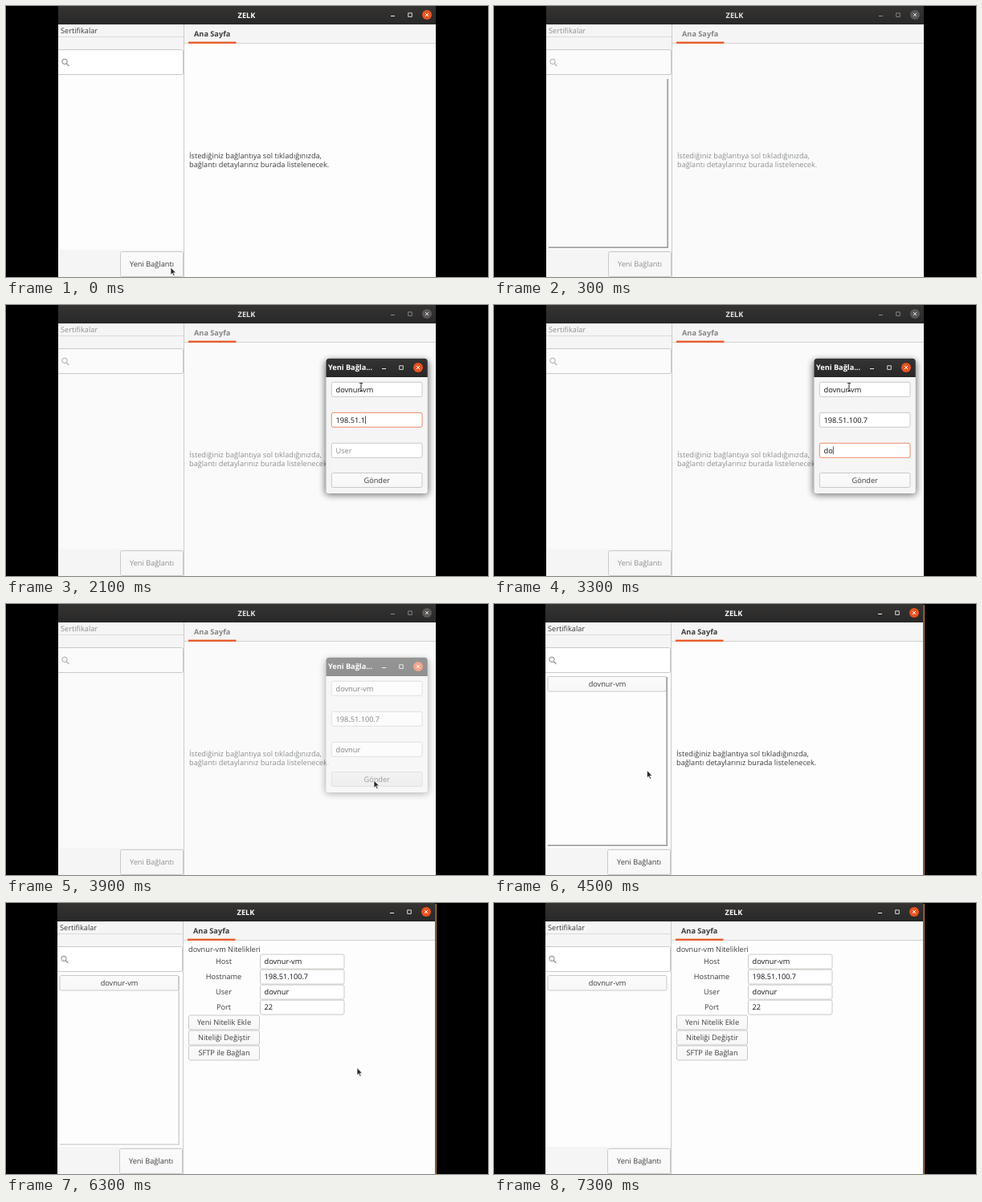
An HTML page for the animation above (7.5 s loop, 600x338 px).

```html
<!DOCTYPE html>
<html lang="tr">
<head>
<meta charset="utf-8">
<title>Zelk</title>
<style>
html, body { margin: 0; width: 100%; height: 100%; overflow: hidden; background: #000; }
svg { display: block; width: 100vw; height: 100vh; }
text { font: 9.2px "Open Sans", "Noto Sans", sans-serif; text-rendering: geometricPrecision; white-space: pre; }
.bold { font-weight: 700; }
.value { font-weight: 500; }
</style>
</head>
<body>
<svg id="stage" viewBox="0 0 600 338">
  <defs>
    <linearGradient id="bar" x2="0" y2="1"><stop stop-color="#353433"/><stop offset="1" stop-color="#292828"/></linearGradient>
    <linearGradient id="btn" x2="0" y2="1"><stop stop-color="#fbfbfb"/><stop offset="1" stop-color="#f7f7f7"/></linearGradient>
    <linearGradient id="hot" x2="0" y2="1"><stop stop-color="#ededed"/><stop offset="1" stop-color="#e3e3e3"/></linearGradient>
    <filter id="blur" x="-20%" y="-20%" width="140%" height="140%"><feGaussianBlur stdDeviation="4"/></filter>
  </defs>
  <g id="view"></g>
</svg>
<script>
const LOOP = 7500, STEP = 100;
const INK = '#3d3d3d', FADED = '#8e9090', DARK = '#111', EDGE = '#cbc9c7', PANEL = '#f5f5f5', ORANGE = '#e95420';
const USER = 'dovnur', HOST = USER + '-vm', IP = '198.51.100.7';
const view = document.getElementById('view');
const pen = document.createElement('canvas').getContext('2d');

const rect = (x, y, w, h, fill, extra = '') =>
  `<rect x="${x}" y="${y}" width="${w}" height="${h}" fill="${fill}" ${extra}/>`;
const box = (x, y, w, h, fill, edge = EDGE) =>
  rect(x + .5, y + .5, w - 1, h - 1, fill, `rx="2" stroke="${edge}"`);
const path = (d, stroke, width = 1, fill = 'none') =>
  `<path d="${d}" stroke="${stroke}" stroke-width="${width}" fill="${fill}"/>`;
// y is the middle of the line
const label = (x, y, str, fill = INK, anchor = 'start', cls = '') =>
  `<text x="${x}" y="${y + 3.2}" fill="${fill}" text-anchor="${anchor}" class="${cls}">${str}</text>`;
const button = (x, y, w, h, str, ink = INK, fill = 'url(#btn)') =>
  box(x, y, w, h, fill) + label(x + w / 2, y + h / 2, str, ink, 'middle');
const group = (str, opacity) => `<g opacity="${opacity}">${str}</g>`;

const clamp = v => Math.max(0, Math.min(1, v));
const ramp = (t, a, b) => clamp((t - a) / (b - a));

// keys: [time, value] pairs; the last one reached holds
const latest = (t, keys) => keys.reduce((v, [at, next]) => t >= at ? next : v, null);
const typed = (t, str, keys) => str.slice(0, latest(t, keys) || 0);

function winButtons(x, y, active) {
  const ink = active ? '#eee' : '#8c8c8c';
  return path(`M${x - 45} ${y + 1.5}h5`, ink) +
    path(`M${x - 23.3} ${y - 2.2}h4.6v4.6h-4.6z`, ink, .9) +
    `<circle cx="${x}" cy="${y}" r="6" fill="${active ? ORANGE : '#595857'}"/>` +
    path(`M${x - 2} ${y - 2}l4 4m0 -4l-4 4`, active ? '#fff' : '#ddd');
}

function sidebar(t, active, ink) {
  const icon = active ? '#808080' : '#a8a8a8';
  let s = rect(65, 23, 156, 315, PANEL) +
    rect(65, 86, 156, 218, active ? '#fdfdfd' : '#fafafa') +
    label(68, 31, 'Sertifikalar', ink) + rect(65, 38, 156, 1, '#dcdbda') +
    rect(65, 54, 155, 32, active ? '#fff' : '#fbfbfb') +
    path('M65 54.5H218.5q2 0 2 2V83.5q0 2 -2 2H65', EDGE) +
    `<circle cx="73" cy="69.3" r="3.2" fill="none" stroke="${icon}"/>` +
    path('M75.4 71.8l3 3', icon, 1.2);
  if (t >= 4100) {
    const hot = t >= 5000 && t < 6200;
    s += button(67.5, 90, 149, 19.5, HOST, ink, hot ? 'url(#hot)' : 'url(#btn)');
  }
  const lines = t < 1000 ? ramp(t, 100, 300) * (1 - ramp(t, 400, 700))
    : ramp(t, 4300, 4500) * (1 - ramp(t, 6000, 6500));
  if (lines) s += group(path('M216.2 91V301.2H68', '#a3a3a3', 1.8), lines);
  const pressed = t === STEP;
  return s + button(142, 306, 79, 32, 'Yeni Bağlantı', ink, pressed ? 'url(#hot)' : active ? 'url(#btn)' : '#f7f7f7');
}

function details() {
  const rows = [['Host', HOST], ['Hostname', IP], ['User', USER], ['Port', '22']];
  return label(228, 58.2, HOST + ' Nitelikleri') +
    rows.map(([name, value], i) => {
      const y = 63.6 + 19 * i;
      return label(272, y + 9.5, name, INK, 'middle') + box(317, y, 105.5, 19, '#fff') +
        label(322.5, y + 9.5, value, DARK, 'start', 'value');
    }).join('') +
    ['Yeni Nitelik Ekle', 'Niteliği Değiştir', 'SFTP ile Bağlan']
      .map((str, i) => button(228, 139.5 + 19 * i, 89, 19, str)).join('');
}

function mainWindow(t, active) {
  const ink = active ? INK : FADED;
  let s = rect(65, 0, 470, 338, active ? '#fdfdfd' : '#fafafa') +
    rect(65, 0, 470, 23, 'url(#bar)') +
    label(299.5, 11.5, 'ZELK', active ? '#fff' : '#e4e4e4', 'middle', 'bold') +
    winButtons(524, 11, active) + sidebar(t, active, ink) +
    rect(222, 23, 313, 23, PANEL) + rect(222, 46, 313, 1, '#d5d3d1') +
    rect(227, 44.6, 59.5, 2.2, ORANGE) +
    label(234, 35, 'Ana Sayfa', active ? INK : '#858585', 'start', 'bold') +
    rect(221, 23, 1, 315, '#cccac8');
  s += t >= 5400 ? details()
    : label(228, 187, 'İstediğiniz bağlantıya sol tıkladığınızda,', ink) +
      label(228, 197.5, 'bağlantı detaylarınız burada listelenecek.', ink);
  if (t < 4100) return s;
  return `<g transform="translate(-1)">${s}</g>` + rect(534.4, 1, 1.6, 337, '#b07a3a');
}

function dialog(t) {
  const fields = [
    ['Host', typed(t, HOST, [[600, 1], [700, 2], [800, 3], [900, 4], [1000, 6], [1100, 7], [1200, 8], [1300, 9]])],
    ['HostName', typed(t, IP, [[1700, 1], [1800, 3], [1900, 4], [2000, 6], [2100, 8], [2300, 9], [2400, 10], [2500, 11], [2600, 12]])],
    ['User', typed(t, USER, [[3100, 1], [3300, 2], [3400, 4], [3500, 6]])]
  ];
  const focus = latest(t, [[0, 0], [1500, 1], [2800, 2], [3700, 3]]);
  let s = rect(397, 69, 129, 168, '#000', 'rx="5" opacity=".55" filter="url(#blur)"') +
    rect(398.4, 66.7, 126.4, 168.3, PANEL, 'rx="3"') +
    path('M398.4 90V70.7q0 -4 4 -4h118.4q4 0 4 4V90z', 'none', 0, 'url(#bar)') +
    label(401, 78.2, 'Yeni Bağla...', '#fff', 'start', 'bold') + winButtons(513, 78, true);
  pen.font = '500 9.2px "Open Sans", "Noto Sans", sans-serif';
  fields.forEach(([hint, value], i) => {
    const y = 95.8 + 38 * i, on = i === focus;
    s += box(404.8, y, 113.7, 19, '#fff', on ? '#ee8a68' : EDGE);
    if (value) s += label(410.5, y + 9.5, value, DARK, 'start', 'value');
    else if (!on) s += label(410.5, y + 9.5, hint, '#8b8e8f');
    if (on) s += rect(410.7 + pen.measureText(value).width, y + 4.5, .8, 10, '#333');
  });
  return s + button(404.8, 209, 113.7, 19, 'Gönder', INK, focus === 3 ? 'url(#hot)' : 'url(#btn)');
}

// time, x, y: eased moves between stops
const stops = [
  [0, 205, 326], [1700, 442, 102], [3600, 442, 102], [3900, 458, 220], [4000, 458, 220],
  [4300, 190.5, 207.5], [4600, 190.5, 207.5], [5100, 173.3, 101.5], [5500, 173.3, 101.5],
  [6100, 437, 205.5], [LOOP, 437, 205.5]
];

function arrow(x, y) {
  return path(`M${x} ${y}v9.3l2.1 -1.9l1.6 3.4l1.5 -.7l-1.6 -3.3h2.9z`, '#fff', .7, '#2a2a2a');
}

function beam(x, y) {
  return path(`M${x - 2} ${y - 4.5}h1.5l.5 .5l.5 -.5h1.5M${x} ${y - 4}v9M${x - 2} ${y + 5.5}h1.5l.5 -.5l.5 .5h1.5`, '#333', 1.1);
}

function pointer(t) {
  if (t < 200) return arrow(stops[0][1], stops[0][2]);
  if (t < 1700 || t >= 6800) return '';
  const i = stops.findIndex(stop => stop[0] > t);
  const [a, b] = [stops[i - 1], stops[i]], k = ramp(t, a[0], b[0]), p = k * k * (3 - 2 * k);
  const x = a[1] + (b[1] - a[1]) * p, y = a[2] + (b[2] - a[2]) * p;
  return t < 3700 ? beam(x, y) : arrow(x, y);
}

function scene(t) {
  const active = t < 200 || (t >= 4000 && t < 4100) || t >= 4500;
  let s = mainWindow(t, active);
  const shown = ramp(t, 300, 500) * (1 - ramp(t, 3800, 4000));
  if (shown) s += group(dialog(t), shown);
  return s + pointer(t);
}

let last = -1;
function tick(now) {
  const t = Math.floor(now % LOOP / STEP) * STEP;
  if (t !== last) view.innerHTML = scene(last = t);
  requestAnimationFrame(tick);
}
tick(performance.now());
</script>
</body>
</html>
```
